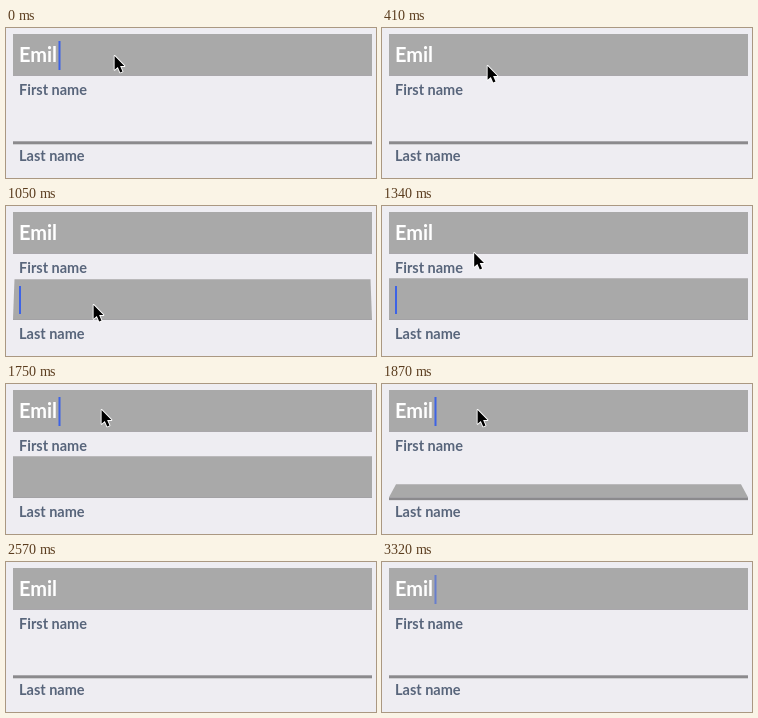
An HTML page with a canvas for the animation above (3.42 s loop, 370x150 px).

```html
<!DOCTYPE html>
<html lang="en">
<head>
<meta charset="utf-8">
<title>Folding form fields</title>
<style>
html, body { margin: 0; width: 370px; height: 150px; overflow: hidden; background: #eeedf2; }
canvas { display: block; }
</style>
</head>
<body>
<canvas id="stage" width="370" height="150"></canvas>
<script>
const LOOP = 3420;
const LEFT = 7, RIGHT = 366, DEPTH = 41;
const ctx = document.getElementById('stage').getContext('2d');

// Pointer stops: time, x, y
const stops = [
  [340, 108, 27], [640, 87, 98], [1250, 87, 98], [1400, 94, 19],
  [1460, 95, 26], [1520, 95, 25], [2310, 95, 25], [2540, 345, 122]
];
const HIDE_POINTER = 2550;

const clamp = v => Math.min(1, Math.max(0, v));
const easeOut = p => 1 - (1 - clamp(p)) ** 4;
const smooth = p => p * p * (3 - 2 * p);

function polygon(points, fill) {
  ctx.beginPath();
  points.forEach(([x, y]) => ctx.lineTo(x, y));
  ctx.closePath();
  ctx.fillStyle = fill;
  ctx.fill();
}

function text(str, y, size, fill) {
  ctx.font = `bold ${size}px Lato, "Open Sans", sans-serif`;
  ctx.fillStyle = fill;
  ctx.fillText(str, 13, y);
}

// A slab hinged at its bottom edge; open = 1 is upright, 0 lies flat
function field(bottom, open) {
  const angle = open * Math.PI / 2;
  const top = bottom - DEPTH * Math.sin(angle);
  const inset = 7.4 * Math.cos(angle);
  const lip = Math.max(0.7, 3 * Math.cos(angle));
  polygon([[LEFT + inset, top], [RIGHT - inset, top], [RIGHT, bottom], [LEFT, bottom]], '#a9a9a9');
  ctx.fillStyle = '#8b8a8d';
  ctx.fillRect(LEFT, bottom, RIGHT - LEFT, lip);
}

function caret(x, y, height, alpha) {
  ctx.globalAlpha = alpha;
  ctx.fillStyle = '#3d63e6';
  ctx.fillRect(x, y, 2, height);
  ctx.globalAlpha = 1;
}

// Solid, then briefly faded, then off
const blink = (t, on, fade) => t < on ? 0 : t < fade ? 1 : t < fade + 60 ? 0.6 : 0;

function pointerAt(t) {
  let i = stops.findIndex(s => s[0] > t);
  if (i === 0) return stops[0].slice(1);
  if (i < 0) return stops.at(-1).slice(1);
  const [t0, x0, y0] = stops[i - 1], [t1, x1, y1] = stops[i];
  const p = smooth((t - t0) / (t1 - t0));
  return [x0 + (x1 - x0) * p, y0 + (y1 - y0) * p];
}

function pointer(x, y) {
  const arrow = new Path2D('M.6 .9V14.8L3.8 11.9 6.2 17.4 8.5 16.4 6.1 11H10.4Z');
  ctx.save();
  ctx.translate(x, y);
  ctx.lineWidth = 1.8;
  ctx.lineJoin = 'round';
  ctx.strokeStyle = '#fff';
  ctx.stroke(arrow);
  ctx.fillStyle = '#000';
  ctx.fill(arrow);
  ctx.restore();
}

function draw(t) {
  ctx.fillStyle = '#eeedf2';
  ctx.fillRect(0, 0, 370, 150);

  field(47, 1);
  field(113.3, easeOut((t - 915) / 340) - easeOut((t - 1760) / 340));

  text('Emil', 34, 20, '#fff');
  text('First name', 67, 14.5, '#58657b');
  text('Last name', 133, 14.5, '#58657b');

  const first = Math.max(blink(t, 0, 300), blink(t, 1750, 2280), blink(t, 2800, 3320));
  // The closing fade lasts until the loop restarts
  caret(52.5, 13, 29, t >= 3320 ? 0.6 : first);
  caret(13, 80, 28, blink(t, 985, 1510));

  if (t < HIDE_POINTER) pointer(...pointerAt(t));
}

const start = performance.now();
function tick() {
  draw((performance.now() - start) % LOOP);
  requestAnimationFrame(tick);
}
tick();
</script>
</body>
</html>
```
